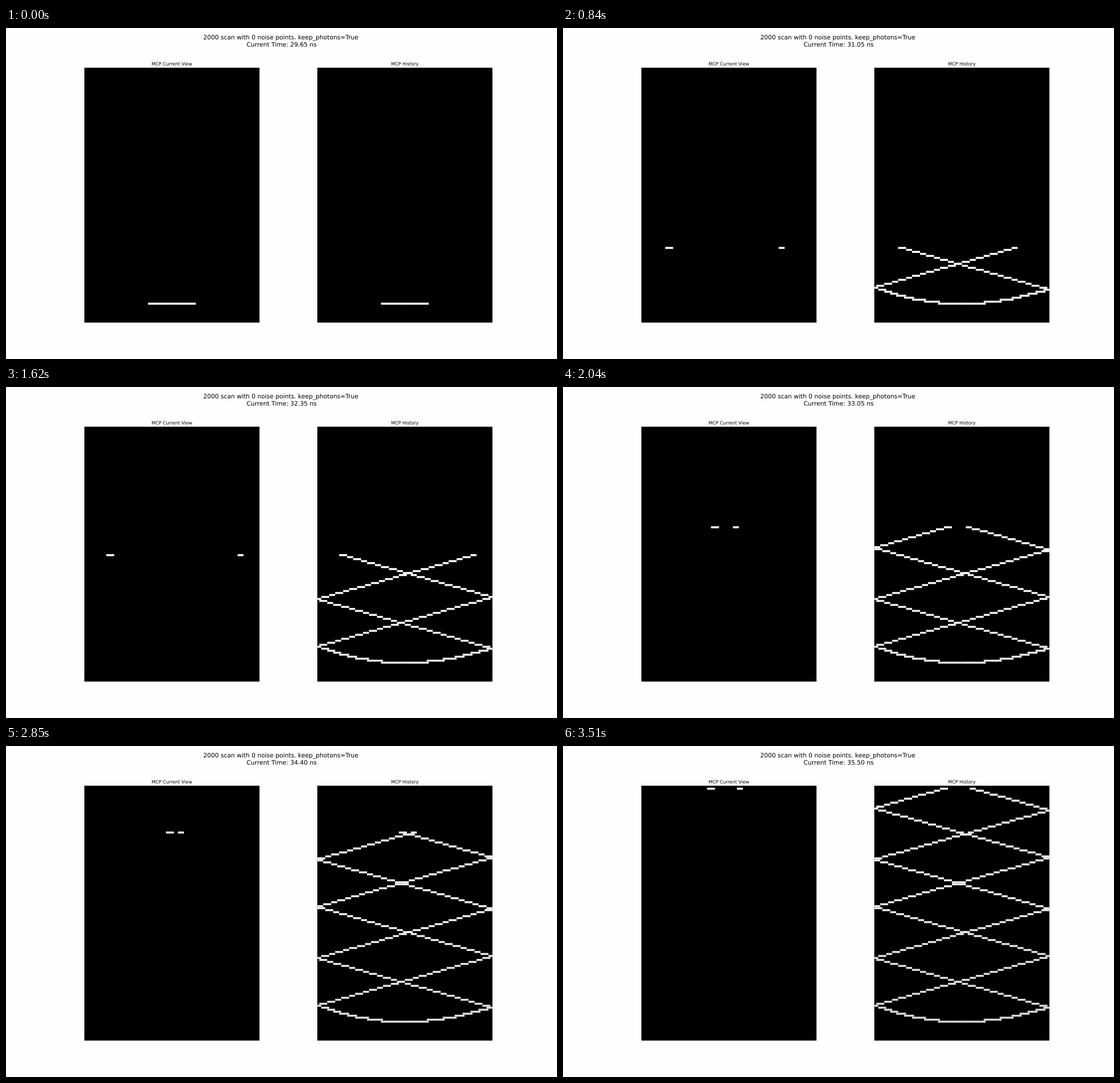
Animation of 966x580 px, one loop 3540 ms. Source, as a matplotlib script:

```python
import matplotlib.pyplot as plt
import numpy as np
from matplotlib.animation import FuncAnimation
from matplotlib.collections import PolyCollection
from matplotlib.patheffects import Normal

W, H, DPI = 966, 580, 48
COLS, ROWS = 88, 128
FRAMES, INTERVAL = 118, 30
T0, DT = 29.65, 0.05
FIRST_ROW = 118
SPEED = 3.553   # cells per step
BURST = 17.5    # extra cells covered in the fast opening
DECAY = 0.7
NEAR = 8        # steps before the first wall, with denser hits


def reach(step):
    """Unfolded cell that a light front has reached."""
    burst = BURST * (1 - np.exp(-DECAY * step))
    return np.floor(COLS / 2 + SPEED * step + burst).astype(int)


def fold(cells):
    """Reflect unfolded cells between the two side walls."""
    x = cells % (2 * COLS)
    return np.where(x < COLS, x, 2 * COLS - 1 - x)


def box(cols, row):
    x0, x1 = cols.min(), cols.max() + 1
    return [(x0, row), (x1, row), (x1, row + 1), (x0, row + 1)]


def time_at(n):
    return T0 + DT * n


steps = np.arange(FRAMES + 1)
right = reach(steps)
# The front that starts leftwards falls one step behind.
left = reach(steps - np.minimum(steps / NEAR, 1) ** 2)

boxes, times = [], []
for n in range(FRAMES):
    overlap = int(0 < n < NEAR)
    to_right, to_left = (fold(np.arange(edge[n] - overlap, edge[n + 1]))
                         for edge in (right, left))
    for cols in (to_right, COLS - 1 - to_left):
        boxes.append(box(cols, FIRST_ROW - n))
        times.append(time_at(n))
boxes, times = np.array(boxes), np.array(times)

plt.rcParams.update({"font.family": "DejaVu Sans", "text.hinting": "none"})
fig, axes = plt.subplots(1, 2, figsize=(W / DPI, H / DPI), dpi=DPI,
                         facecolor="#fefefe")
# Drawing text as outlines keeps its position finer than a pixel.
outline = {"path_effects": [Normal()]}
heading = fig.suptitle("", fontsize=16, **outline)


def make_panel(ax, name):
    ax.set_title(name, fontsize=12, **outline)
    ax.set(xlim=(0, COLS), ylim=(ROWS, 0), aspect="equal",
           xticks=[], yticks=[], facecolor="black")
    ax.spines[:].set_visible(False)
    ax.patch.set_snap(False)
    hits = PolyCollection([], cmap="gray", edgecolors="none", linewidths=0,
                          snap=False)
    ax.add_collection(hits, autolim=False)
    return hits


current = make_panel(axes[0], "MCP Current View")
history = make_panel(axes[1], "MCP History")


def update(n):
    now = time_at(n)
    heading.set_text("2000 scan with 0 noise points. keep_photons=True \n"
                     f"Current Time: {now:.2f} ns")
    end = 2 * (n + 1)
    for hits, start in ((current, end - 2), (history, 0)):
        hits.set_verts(boxes[start:end])
        hits.set_array(times[start:end])
        hits.set_clim(0, now)
    return [heading, current, history]


anim = FuncAnimation(fig, update, frames=FRAMES, interval=INTERVAL,
                     repeat=True, repeat_delay=0, blit=False)
plt.show()
```
